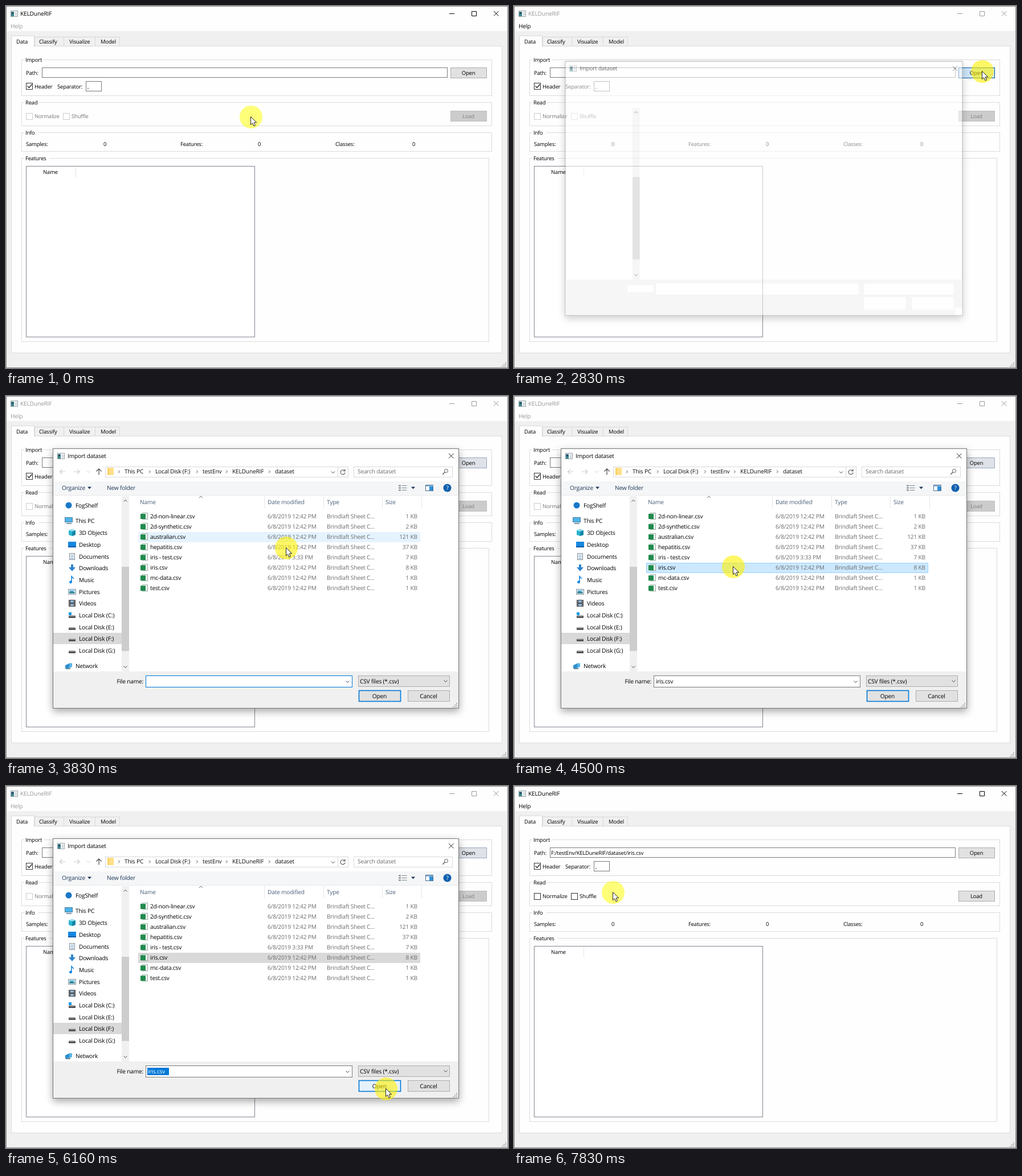
These frames come from a looping animation (881 px wide and 636 px high, 8000 ms). An HTML page:

```html
<!DOCTYPE html>
<html lang="en">
<head>
<meta charset="utf-8">
<title>Import dataset</title>
<style>
  html, body { margin: 0; width: 100%; height: 100%; overflow: hidden; background: #f0f0f0; }
  svg { display: block; width: 100vw; height: 100vh; }
  text { font: 10.2px "Open Sans", "Noto Sans", sans-serif; letter-spacing: -.2px;
         text-rendering: geometricPrecision; white-space: pre; }
  #form text { font-size: 9.5px; }
  #shell { filter: drop-shadow(0 5px 7px rgba(0, 0, 0, .35)); }
</style>
</head>
<body>
<svg id="stage" viewBox="0 0 881 636"></svg>
<script>
const APP = 'KELDuneRIF';
const LOOP = 8000, LAST = 47;
const BLUE = '#0078d7', LINE = '#dcdcdc', EDGE = '#7a7a7a';

// Drawing helpers; boxes take left, top, right, bottom pixels.
const fill = (x, y, r, b, color, extra = '') =>
  `<rect x="${x}" y="${y}" width="${r - x}" height="${b - y}" fill="${color}" ${extra}/>`;
const box = (x, y, r, b, color, stroke, extra = '') =>
  `<rect x="${x + .5}" y="${y + .5}" width="${r - x}" height="${b - y}" fill="${color}" stroke="${stroke}" ${extra}/>`;
const text = (x, y, s, color = '#000', extra = '') =>
  `<text x="${x}" y="${y}" fill="${color}" ${extra}>${s}</text>`;
const MID = 'text-anchor="middle"', END = 'text-anchor="end"';
const line = (d, color = '#444', w = 1, extra = '') =>
  `<path d="${d}" fill="none" stroke="${color}" stroke-width="${w}" ${extra}/>`;
const shape = (d, color) => `<path d="${d}" fill="${color}"/>`;
const group = (id, s) => `<g id="${id}">${s}</g>`;
const at = (x, y, s) => `<g transform="translate(${x} ${y})">${s}</g>`;
const down = (x, y, c) => line(`M${x - 3} ${y - 1.5}l3 3 3-3`, c);
const up = (x, y, c) => line(`M${x - 3} ${y + 1.5}l3-3 3 3`, c);
const right = (x, y) => line(`M${x - 1} ${y - 2.5}l2.5 2.5-2.5 2.5`, '#555');
const tri = (x, y) => shape(`M${x - 3.5} ${y - 2}h7l-3.5 4z`, '#1e395b');

const grip = (x, y) => {
  let s = '';
  for (let i = 0; i < 3; i++)
    for (let j = 2 - i; j < 3; j++) s += fill(x + i * 3, y + j * 3, x + i * 3 + 2, y + j * 3 + 2, '#b4b4b4');
  return s;
};
const appIcon = (x, y) => at(x, y,
  box(0, 0, 12, 10, '#f4f6f7', '#9aa3a8') + fill(1, 2, 6, 10, '#3d8a8c') +
  fill(2, 3, 5, 6, '#346') + fill(8, 3, 11, 9, '#d3dade'));

function mainWindow() {
  const frame = (name, y, r, b) =>
    box(27, y, r, b, 'none', LINE) + fill(32, y - 2, 38 + name.length * 4.7, y + 3, '#fefefe') +
    text(34, y + 4, name);
  const tab = (x, r, tx, name) => box(x, 54, r, 70, '#f0f0f0', '#d9d9d9') + text(tx, 66, name);
  const check = (x, y, id) => box(x, y, x + 11, y + 11, '#fff', '#333', `id="${id}"`);
  const button = (x, y, r, b, name, id) =>
    box(x, y, r, b, '#e1e1e1', '#adadad', `id="${id}"`) +
    text((x + r) / 2, y + 13, name, '#000', `${MID} id="${id}Text"`);
  const info = [['Samples:', 35, 171], ['Features:', 306, 442], ['Classes:', 578, 713]];

  const chrome =
    fill(0, 0, 881, 636, '#f0f0f0') + fill(0, 0, 881, 44, '#fefefe') + appIcon(8, 8) +
    group('caption', text(25, 17, APP, 'currentColor') +
      line('M778 13.5h9M817.5 9.5h8v8h-8zM856 9l8.5 8.5M864.5 9l-8.5 8.5', 'currentColor')) +
    text(8, 39, 'Help', '#000', 'id="help"') +
    box(9, 70, 870, 609, '#fefefe', LINE) + grip(870, 626);

  const form =
    tab(50, 101, 58, 'Classify') + tab(101, 156, 111, 'Visualize') + tab(156, 199, 166, 'Model') +
    box(9, 52, 49, 71, '#fefefe', '#d9d9d9') + fill(10, 70, 49, 73, '#fefefe') + text(18, 66, 'Data') +
    frame('Import', 94, 852, 157) + frame('Read', 169, 852, 210) +
    frame('Info', 222, 852, 255) + frame('Features', 267, 847, 589) +
    text(35, 121, 'Path:') + box(63, 108, 774, 125, '#fff', EDGE, 'id="field"') +
    text(65, 121, `F:/testEnv/${APP}/dataset/iris.csv`, '#000', 'id="path"') +
    button(780, 108, 843, 126, 'Open', 'open') +
    check(35, 135, 'header') + line('M37.5 140.5l3 3 5-6', '#222', 1.3) + text(50, 145, 'Header') +
    text(90, 145, 'Separator:') + box(140, 132, 167, 149, '#fff', EDGE) + text(143, 145, ',') +
    check(35, 188, 'norm') + text(50, 197, 'Normalize', '#000', 'id="normText"') +
    check(100, 188, 'shuf') + text(115, 197, 'Shuffle', '#000', 'id="shufText"') +
    button(780, 184, 843, 202, 'Load', 'load') +
    info.map(([s, x, zero]) => text(x, 246, s) + text(zero, 246, '0')).join('') +
    box(35, 281, 436, 581, '#fff', '#828790') + text(78, 295, 'Name', '#000', MID) +
    fill(122, 283, 123, 301, '#e5e5e5');

  return chrome + group('form', form) + box(0, 0, 880, 635, 'none', '#8a8a8a');
}

// Sidebar icons, drawn around 0,0.
const drive = fill(-6, 1, 6, 5, '#555') + fill(-5, 0, 5, 2, '#aaa');
const icons = {
  cloud: '<circle r="5.5" fill="#1a78c8"/>',
  pc: fill(-7, -6, 7, 3, '#4a7f9e') + fill(-6, -5, 6, 2, '#4db4ea') + fill(-4, 4, 5, 6, '#7c98a8'),
  cube: shape('M-6-4L0-6 6-4V4L0 6-6 4z', '#2bb3cf') + shape('M0-2L6-4V4L0 6z', '#1787a8') + shape('M-6-4L0-6 6-4 0-2z', '#8be0ee'),
  desk: fill(-7, -5, 7, 5, '#1787e0') + fill(-7, 3, 7, 5, '#0b5ca8'),
  doc: box(-5, -6, 4, 5, '#fff', '#7d8890') + line('M-3-2.5h6M-3 .5h6M-3 3.5h6', '#5a93bd'),
  arrow: shape('M-2-6h4v5h4L0 6-6-1h4z', '#2f84d0'),
  note: line('M-1 4V-6l4 4', '#1787e0', 1.6) + '<circle cx="-2.5" cy="4" r="2.4" fill="#1787e0"/>',
  photo: box(-7, -5, 6, 4, '#e8f4fb', '#8a949b') + shape('M-5 3V0l4-2 6 3v2z', '#3f8a9c') + fill(-5, -3, 5, -1, '#7cc3ea'),
  film: fill(-6, -6, 6, 6, '#444') + fill(-3, -5, 3, -1, '#8fb4d4') + fill(-3, 1, 3, 5, '#8fb4d4') +
    line('M-4.5-6V6M4.5-6V6', '#ddd', 1, 'stroke-dasharray="1.5 1.5"'),
  drive,
  system: drive + fill(-6, -5, -1, 0, '#1a9be0'),
  net: shape('M-6-1L3-5V3L-6 5z', '#2d8fd0') + shape('M1-3l5-2v7L1 4z', '#5ab4e6') + fill(-5, 4, 3, 6, '#6b8796')
};

const places = [
  ['cloud', 'FogShelf', 192], ['pc', 'This PC', 219],
  ...[['cube', '3D Objects'], ['desk', 'Desktop'], ['doc', 'Documents'], ['arrow', 'Downloads'],
    ['note', 'Music'], ['photo', 'Pictures'], ['film', 'Videos'], ['system', 'Local Disk (C:)'],
    ['drive', 'Local Disk (E:)'], ['drive', 'Local Disk (F:)'], ['drive', 'Local Disk (G:)']
  ].map(([icon, s], i) => [icon, s, Math.round(240.3 + i * 20.65), 6]),
  ['net', 'Network', 474]
];
const files = [['2d-non-linear', 1], ['2d-synthetic', 2], ['australian', 121], ['hepatitis', 37],
  ['iris - test', 7], ['iris', 8], ['mc-data', 1], ['test', 1]];
const rowY = i => 211 + i * 18.05;

function dialog() {
  const shell =
    box(82, 92, 794, 548, '#fff', '#777', 'id="shell"') + appIcon(90, 100) + text(108, 109, 'Import dataset') +
    line('M777 101l8.5 8.5M785.5 101l-8.5 8.5', '#222') +
    fill(203, 176, 216, 484, '#f0f0f0') + fill(203, 300, 216, 448, '#cdcdcd') +
    up(209.5, 184) + down(209.5, 476) + fill(83, 484, 794, 548, '#f0f0f0');

  const blanks = [[194, 494, 241, 507], [245, 491, 608, 511], [618, 491, 779, 511],
    [618, 516, 693, 538], [704, 516, 779, 538], [781, 534, 794, 548]]
    .map(b => fill(...b, '#fff')).join('');

  const crumbs = [['This PC', 208], ['Local Disk (F:)', 262], ['testEnv', 345], [APP, 397], ['dataset', 472]]
    .map(([s, x]) => right(x - 10, 133) + text(x, 136, s, '#111')).join('');
  const nav =
    line('M104 133H94.5m4-4l-4 4 4 4M119 133h10m-4-4l4 4-4 4', '#ccc', 1.2) + down(145, 133, '#ccc') +
    line('M163 138.5V128m-4.5 4.5l4.5-4.5 4.5 4.5', '#555', 1.3) +
    box(174, 124, 600, 142, '#fff', '#d9d9d9') + fill(582, 125, 583, 142, '#d9d9d9') +
    fill(178, 126, 189, 139, '#ffdf88') + fill(178, 126, 181, 139, '#fbd368') + crumbs +
    down(574, 134) + line('M594.2 131.3a4 4 0 1 0 .8 3M595 128.5v3.2h-3.2', '#555', 1.1) +
    box(610, 124, 783, 142, '#fff', '#d9d9d9') + text(617, 136, 'Search dataset', '#6d6d6d') +
    '<circle cx="772.5" cy="131.5" r="3" fill="none" stroke="#555"/>' + line('M770.3 133.7l-4 4', '#555', 1.3);

  const tools =
    fill(83, 150, 794, 174, '#f5f6f7') + fill(83, 174, 794, 175, '#e8e9ea') +
    text(98, 165, 'Organize', '#1e395b') + tri(146.5, 161.5) + text(177, 165, 'New folder', '#1e395b') +
    line('M689 157.5h4M689 161.5h4M689 165.5h4', '#7b858c', 2) +
    line('M694.5 157.5h9M694.5 161.5h9M694.5 165.5h9', '#7b858c') +
    tri(714.5, 161.5) + box(736, 156, 749, 166, '#fff', '#4a6f92') + fill(737, 157, 750, 159, '#8ab4d8') +
    fill(743, 159, 749, 166, '#2f8fd6') +
    '<circle cx="774.5" cy="161.5" r="7" fill="#0e5fae"/>' + text(774.5, 165.2, '?', '#fff', `${MID} font-weight="bold"`);

  const side = fill(83, 416, 203, 436, '#d9d9d9') + places.map(([icon, s, y, dent = 0]) =>
    at(110 + dent, y, icons[icon]) + text(122 + dent, y + 4, s)).join('');

  const heads = [['Name', 235], ['Date modified', 459], ['Type', 563], ['Size', 666]]
    .map(([s, x]) => text(x, 190, s, '#4c607a')).join('') +
    [453, 557, 660, 729].map(x => fill(x, 176, x + 1, 197, '#e5e5e5')).join('') + up(342, 177.5, '#666');

  const rows = files.map(([name, size], i) => {
    const y = rowY(i), c = '#6d6d6d';
    return box(239, y - 6, 248, y + 5, '#fff', '#8fa898') + fill(236, y - 4, 245, y + 5, '#1f8a4c') +
      text(253, y + 4, name + '.csv') +
      text(459, y + 4, `6/8/2019 ${i === 4 ? '3:33' : '12:42'} PM`, c) +
      text(563, y + 4, 'Brindlaft Sheet C...', c) + text(722, y + 4, size + ' KB', c, END);
  }).join('');

  const foot =
    text(241, 505, 'File name:', '#000', END) + box(245, 491, 607, 511, '#fff', BLUE, 'id="name"') +
    fill(248, 495, 286, 508, BLUE, 'id="mark"') + text(249, 505, 'iris.csv', '#000', 'id="nameText"') +
    fill(248, 495, 249, 508, '#000', 'id="caret"') + down(599.5, 502) +
    box(618, 491, 778, 510, '#e1e1e1', '#adadad') + text(621, 505, 'CSV files (*.csv)') + down(771.5, 501) +
    box(619, 517, 692, 536, '#e1e1e1', BLUE, 'id="accept" stroke-width="1.6"') +
    text(655.5, 531, 'Open', '#000', MID) +
    box(705, 517, 778, 536, '#e1e1e1', '#adadad') + text(741.5, 531, 'Cancel', '#000', MID) + grip(784, 539);

  return shell + group('blanks', blanks) +
    group('content', nav + tools + side + heads + '<rect id="row" x="232.5" width="494" height="17"/>' + rows + foot);
}

const arrow = '<path id="arrow" d="M0 0V14.2L3.2 11.2 5.4 16.4 7.9 15.3 5.7 10.3H10.2Z" fill="#fff" stroke="#222"/>';
const beam = line('M-3-6.5h2.2l.8.7.8-.7H3M0-6V6M-3 6.5h2.2L0 5.8l.8.7H3', '#222', 1.2, 'id="beam"');

document.getElementById('stage').innerHTML =
  mainWindow() + group('dialog', dialog()) +
  '<circle id="glow" r="20"/>' + group('pointer', arrow + beam);

const el = {};
document.querySelectorAll('[id]').forEach(n => el[n.id] = n);
const show = (id, on) => el[id].style.display = on ? '' : 'none';
const set = (id, attrs) => { for (const a in attrs) el[id].setAttribute(a, attrs[a]); };
const paint = (id, color, stroke) => set(id, { fill: color, stroke });

// Pointer route: step, x, y.
const route = [[4, 430, 195], [5, 445, 191], [7, 600, 152], [9, 727, 123], [11, 822, 115], [18, 822, 115],
  [20, 775, 140], [22, 580, 235], [23, 492, 267], [25, 385, 300], [28, 385, 300], [29, 420, 326],
  [31, 710, 510], [32, 705, 521], [34, 667, 532], [43, 667, 532], [44, 615, 497], [46, 235, 232], [47, 174, 187]];

function pointerAt(k) {
  const i = route.findIndex(p => p[0] >= k);
  if (i === 0) return route[0].slice(1);
  const [k0, x0, y0] = route[i - 1], [k1, x1, y1] = route[i];
  const p = (k - k0) / (k1 - k0);
  return [x0 + (x1 - x0) * p, y0 + (y1 - y0) * p];
}

function drawMain(k) {
  const away = k >= 17 && k < 40, loaded = k >= 40;
  el.caption.style.color = away ? '#999' : '#000';
  set('help', { fill: k < 1 || (k >= 18 && k < 40) ? '#999' : '#000' });
  set('field', { stroke: k === 10 ? '#333' : EDGE });
  show('path', loaded);
  if (k >= 15 && k < 18) paint('open', '#cce4f7', '#005499');
  else if (k >= 11 && k < 15) paint('open', '#e5f1fb', BLUE);
  else if (away) paint('open', '#dfe2e8', '#9aa9ba');
  else paint('open', '#e1e1e1', '#adadad');
  for (const id of ['norm', 'shuf']) {
    set(id, { stroke: loaded ? '#333' : '#ccc' });
    set(id + 'Text', { fill: loaded ? '#000' : '#777' });
  }
  paint('load', loaded ? '#e1e1e1' : '#ccc', loaded ? '#adadad' : '#bfbfbf');
  set('loadText', { fill: loaded ? '#000' : '#838383' });
}

function drawDialog(k) {
  show('dialog', k >= 17 && k < 40);
  const opening = k === 17, closing = k === 39;
  const scale = opening ? .979 : closing ? .958 : 1;
  set('dialog', {
    opacity: opening ? .55 : closing ? .13 : 1,
    transform: `translate(438.5 320.5) scale(${scale}) translate(-438.5 -320.5)`
  });
  show('blanks', opening);
  show('content', !opening);

  const picked = k >= 26, pressed = k >= 36;
  const row = picked ? 5 : { 22: 1, 23: 2, 24: 4, 25: 5 }[k];
  show('row', row !== undefined);
  if (row !== undefined) set('row', { y: Math.round(rowY(row) - 8.5) + .5 });
  if (pressed) paint('row', '#d9d9d9', '#d9d9d9');
  else if (picked) paint('row', '#cce8ff', '#99d1ff');
  else paint('row', '#e5f3ff', '#e5f3ff');

  set('name', { stroke: picked ? EDGE : BLUE });
  show('nameText', picked);
  set('nameText', { fill: pressed ? '#fff' : '#000' });
  show('mark', pressed);
  show('caret', k >= 19 && k < 23);
  set('accept', { fill: k >= 33 ? '#e5f1fb' : '#e1e1e1' });
}

function drawPointer(k) {
  const [x, y] = pointerAt(k);
  const typing = k === 9 || k === 10;
  const warm = k >= 5 && k < 39;
  set('glow', { cx: x, cy: y, fill: warm ? '#fff200' : '#ff0', 'fill-opacity': warm ? .6 : .52 });
  set('pointer', { transform: typing ? `translate(${x + 2} ${y + 1})` : `translate(${x - .5} ${y - .5})` });
  show('arrow', !typing);
  show('beam', typing);
}

// The screen refreshes six times a second.
function tick() {
  const t = performance.now() % LOOP;
  const k = Math.min(LAST, Math.floor((t + 7) * .006));
  drawMain(k);
  drawDialog(k);
  drawPointer(k);
  requestAnimationFrame(tick);
}
tick();
</script>
</body>
</html>
```
